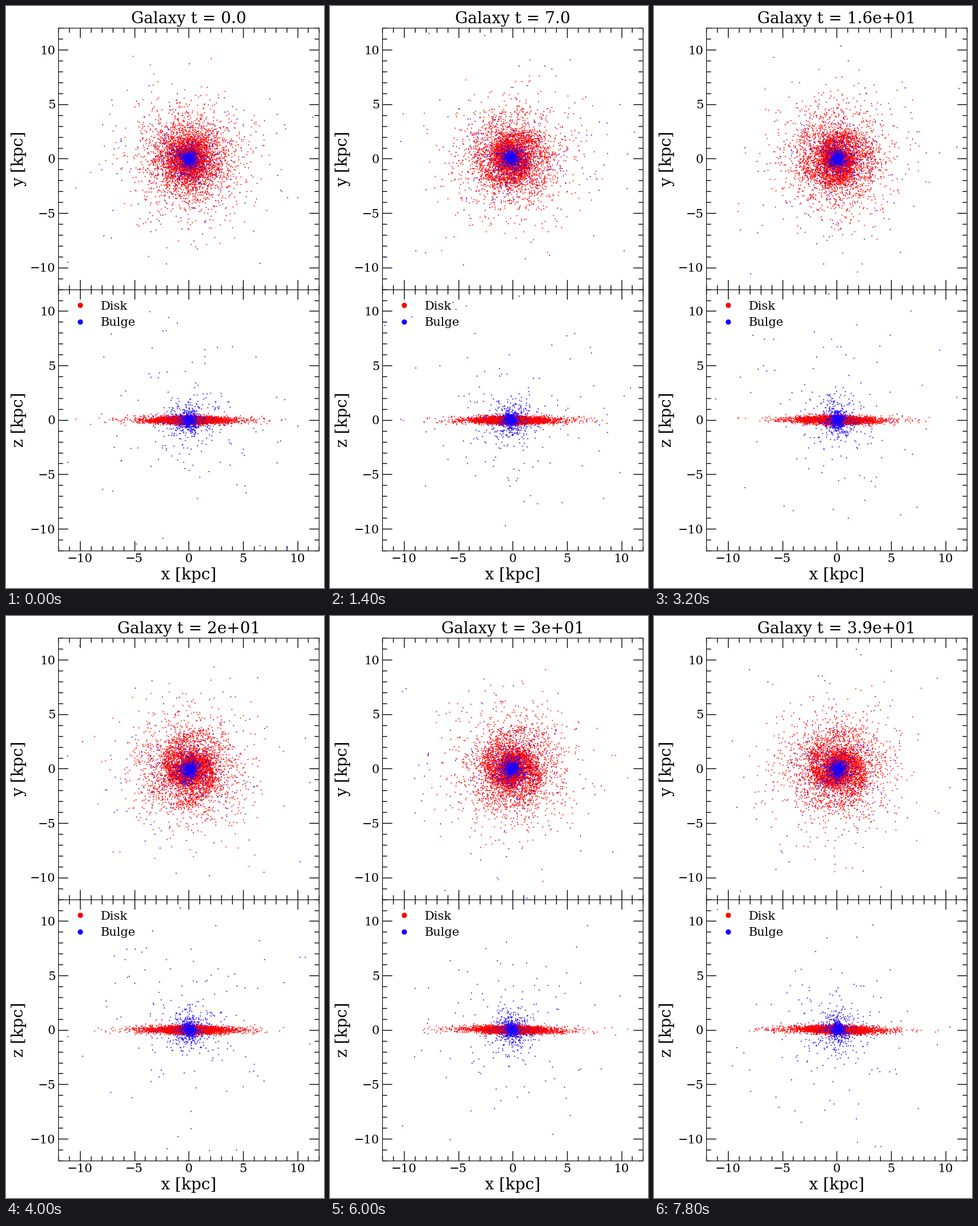
Animation of 554x1012 px, one loop 8 s. Source, as a matplotlib script:

```python
import numpy as np
import matplotlib.pyplot as plt
from matplotlib.animation import FuncAnimation
from matplotlib.ticker import MultipleLocator

W, H, DPI = 554, 1012, 100
FRAMES, INTERVAL = 40, 200
RED, BLUE = "#ff0000", "#1a00ff"
N_DISK, N_BULGE = 5000, 1200
SPEED = 1.0  # rotation speed in kpc per time step

# Slow drift of the centre and tilt of the disk over time
KEYS = [0, 7, 12, 20, 26, 34, 39]
DRIFT_X = [0, -0.2, 0, 0.1, -0.18, 0, 0.1]
DRIFT_Y = [0, 0.07, 0.07, -0.05, 0, 0.05, -0.02]
DRIFT_Z = [0, 0, 0, 0.03, 0, 0.09, 0.06]
TILT = [0, 0, -0.025, -0.008, -0.018, -0.025, -0.02]

plt.rcParams["font.family"] = "DejaVu Serif"
rng = np.random.default_rng(7)


def phases(n):
    return rng.uniform(0, 2 * np.pi, n)


def spin(radius):
    return SPEED / np.hypot(radius, 0.6)


# Exponential disk
disk_r = rng.gamma(2.0, 1.03, N_DISK)
disk_angle, disk_phase, disk_zphase = (phases(N_DISK) for _ in range(3))
disk_e = np.abs(rng.normal(0, 0.1, N_DISK))
disk_z = rng.rayleigh(0.17, N_DISK)

# Bulge on randomly oriented rosettes
root = np.sqrt(rng.uniform(0, 0.995, N_BULGE))
bulge_r = 0.25 * root / (1 - root)
bulge_angle, bulge_phase = phases(N_BULGE), phases(N_BULGE)
bulge_e = rng.uniform(0, 0.5, N_BULGE)
axis_u = rng.normal(size=(3, N_BULGE))
axis_u /= np.linalg.norm(axis_u, axis=0)
axis_w = np.cross(axis_u, rng.normal(size=(3, N_BULGE)), axis=0)
axis_w /= np.linalg.norm(axis_w, axis=0)


def centre(t):
    return [np.interp(t, KEYS, d) for d in (DRIFT_X, DRIFT_Y, DRIFT_Z)]


def disk_at(t):
    cx, cy, cz = centre(t)
    omega = spin(disk_r)
    theta = disk_angle + omega * t
    r = disk_r * (1 + disk_e * np.sin(1.4 * omega * t + disk_phase))
    # Trailing two-armed density wave that grows from a smooth start
    growth = 0.24 * (1 - np.exp(-t / 5))
    wave = np.sin(2 * theta + 2.4 * disk_r - 0.7 * t)
    r = r + growth * wave * np.exp(-((disk_r - 2.8) / 1.8) ** 2)
    x, y = r * np.cos(theta), r * np.sin(theta)
    z = disk_z * np.sin(2 * omega * t + disk_zphase)
    z = z + np.interp(t, KEYS, TILT) * x * np.exp(-(r / 8) ** 2)
    fade = np.exp(-r / 3)
    return x + cx * fade, y + cy * fade, z + cz * np.exp(-r / 8)


def bulge_at(t):
    omega = spin(bulge_r)
    psi = bulge_angle + omega * t
    r = bulge_r * (1 + bulge_e * np.sin(1.4 * omega * t + bulge_phase))
    pos = r * (np.cos(psi) * axis_u + np.sin(psi) * axis_w)
    fade = np.exp(-r / 3)
    return [p + c * fade for p, c in zip(pos, centre(t))]


# The small margin keeps the pixel size from rounding down
fig = plt.figure(figsize=((W + 0.01) / DPI, (H + 0.01) / DPI), dpi=DPI,
                 facecolor="white")


def panel(top, bottom, ylabel):
    left, right = 91, 545.4
    ax = fig.add_axes([left / W, 1 - bottom / H, (right - left) / W, (bottom - top) / H])
    ax.set(xlim=(-12, 12), ylim=(-12, 12))
    for axis in (ax.xaxis, ax.yaxis):
        axis.set_major_locator(MultipleLocator(5))
        axis.set_minor_locator(MultipleLocator(1))
    ax.tick_params(which="both", direction="in", top=True, right=True, width=1)
    ax.tick_params(which="major", length=12, labelsize=15)
    ax.tick_params(which="minor", length=6)
    ax.set_ylabel(ylabel, fontsize=20)
    dots = [
        ax.plot([], [], "o", ms=1.4, mew=0, color=color, zorder=2 + i / 10)[0]
        for i, color in enumerate((RED, BLUE))
    ]
    return ax, dots


top_ax, top_dots = panel(38.4, 492.6, "y [kpc]")
low_ax, low_dots = panel(492.6, 946.9, "z [kpc]")
top_ax.tick_params(labelbottom=False)
low_ax.set_xlabel("x [kpc]", fontsize=20)
title = top_ax.set_title("", fontsize=20)

for label, color, y in (("Disk", RED, 520.5), ("Bulge", BLUE, 549.2)):
    fig.add_artist(plt.Line2D([129.2 / W], [1 - y / H], marker="o", ms=6.6,
                              mew=0, color=color, zorder=5))
    fig.text(165 / W, 1 - (y + 7) / H, label, fontsize=15, va="baseline", zorder=5)


def update(frame):
    t = float(frame)
    title.set_text(f"Galaxy t = {t:.2}")
    for i, (x, y, z) in enumerate((disk_at(t), bulge_at(t))):
        top_dots[i].set_data(x, y)
        low_dots[i].set_data(x, z)
    return [title, *top_dots, *low_dots]


anim = FuncAnimation(fig, update, frames=FRAMES, interval=INTERVAL,
                     repeat=True, repeat_delay=0, blit=False)
plt.show()
```
